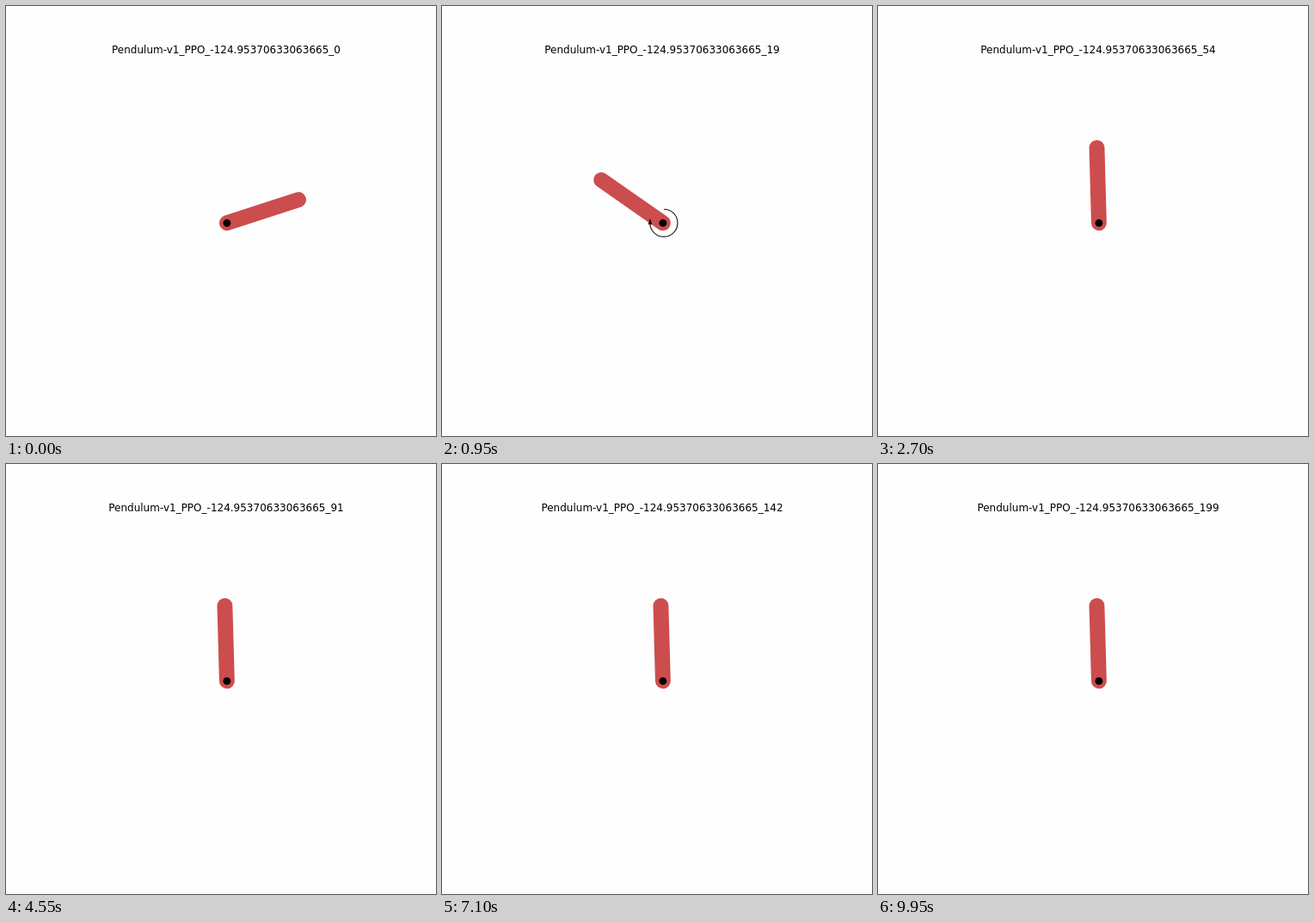
An HTML page that plays this animation: 500x500 px, repeating every 10 s.

```html
<!DOCTYPE html>
<html lang="en">
<head>
<meta charset="utf-8">
<title>Pendulum</title>
<style>
  html, body { margin: 0; width: 100%; height: 100%; overflow: hidden; background: #fefefe; }
  svg { display: block; width: 500px; height: 500px; }
  text { font: 12px "DejaVu Sans", sans-serif; text-anchor: middle; }
</style>
</head>
<body>
<svg viewBox="0 0 500 500">
  <text id="title" x="256" y="55"></text>
  <g transform="translate(256.9 252.3)">
    <path id="rod" d="M0 0V-87.5" stroke="#cc4d4d" stroke-width="17.9" stroke-linecap="round"/>
    <g id="torque">
      <path d="M1 -16.1A16.1 16.1 0 1 1 -15.1 0" fill="none" stroke="#222" stroke-width="1.2"/>
      <path d="M-15 -5.2L-12.7 1.6L-17.1 1.6Z"/>
    </g>
    <circle r="4.4"/>
  </g>
</svg>
<script>
const STEP = 50, COUNT = 200, DT = 0.05;
const $ = id => document.getElementById(id);
const clamp = (v, m) => Math.max(-m, Math.min(m, v));

// Coast through the bottom, then drive and brake towards the top.
function policy(angle, speed) {
  return angle > 0 ? clamp(0.14 - 10 * angle - 2.26 * speed, 2) : 0;
}

// Angle is counterclockwise from upright, in radians.
function simulate() {
  const states = [];
  let angle = -1.257, speed = 0.85, torque = 0;
  for (let i = 0; i < COUNT; i++) {
    states.push({ angle, torque });
    torque = policy(angle, speed);
    speed = clamp(speed + (15 * Math.sin(angle) + 3 * torque) * DT, 8);
    angle += speed * DT;
    if (angle < -Math.PI) angle += 2 * Math.PI;
  }
  return states;
}

const states = simulate();
const start = performance.now();
let shown = -1;

function draw(now) {
  const i = Math.floor(Math.max(0, now - start) / STEP) % COUNT;
  if (i !== shown) {
    const { angle, torque } = states[i];
    $("title").textContent = "Pendulum-v1_PPO_-124.95370633063665_" + i;
    $("rod").setAttribute("transform", `rotate(${-angle * 180 / Math.PI})`);
    $("torque").setAttribute("transform", `scale(${-torque} ${Math.abs(torque)})`);
    shown = i;
  }
  requestAnimationFrame(draw);
}
draw(start);
</script>
</body>
</html>
```
